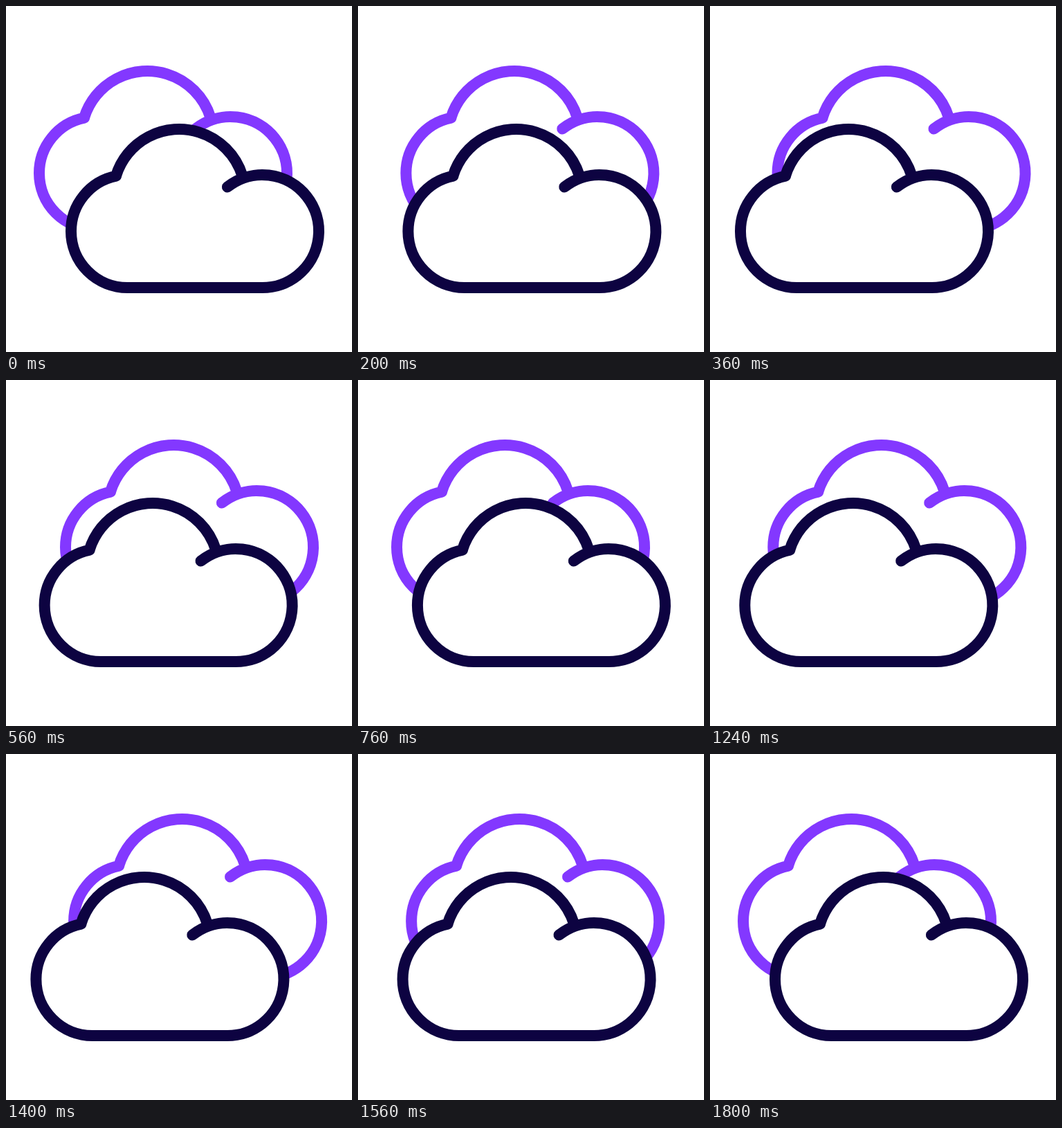
Recreate the animation shown at these times as an HTML page with a canvas. Size 500 px wide and 500 px high, loop 2 s.

```html
<!DOCTYPE html>
<html lang="en">
<head>
<meta charset="utf-8">
<title>Drifting clouds</title>
<style>
  html, body { margin: 0; width: 100%; height: 100%; overflow: hidden; background: #fff; }
  canvas { display: block; width: 500px; height: 500px; }
</style>
</head>
<body>
<canvas id="stage" width="500" height="500"></canvas>
<script>
const ctx = document.getElementById('stage').getContext('2d');
const LOOP = 2000, STEP = 40;

// Key times in ms and how far apart the clouds have drifted (0..1)
const KEYS = [[40, 0], [400, 1], [880, 0], [1360, 1], [1800, 0]];

function drift(t) {
  for (let i = 1; i < KEYS.length; i++) {
    const [t0, a] = KEYS[i - 1], [t1, b] = KEYS[i];
    if (t < t1) {
      const p = Math.max(0, (t - t0) / (t1 - t0));
      return a + (b - a) * p * p * (3 - 2 * p);
    }
  }
  return 0;
}

function arcBetween(path, cx, cy, r, x0, y0, x1, y1) {
  path.arc(cx, cy, r, Math.atan2(y0 - cy, x0 - cx), Math.atan2(y1 - cy, x1 - cx));
}

const cloud = new Path2D();
arcBetween(cloud, 370.5, 325.5, 81.5, 320.5, 262.3, 370.5, 407);  // right lobe
arcBetween(cloud, 175.5, 325.5, 81.5, 175.5, 407, 159.2, 245.6);  // base and left lobe
arcBetween(cloud, 250.3, 273.5, 95.5, 159.2, 245.2, 341.5, 245.2); // crown

function drawCloud(x, y, color) {
  ctx.save();
  ctx.translate(x, y);
  ctx.fillStyle = '#fff';
  ctx.fill(cloud);
  ctx.strokeStyle = color;
  ctx.lineWidth = 16;
  ctx.lineCap = ctx.lineJoin = 'round';
  ctx.stroke(cloud);
  ctx.restore();
}

function draw(t) {
  const d = drift(t);
  ctx.fillStyle = '#fff';
  ctx.fillRect(0, 0, 500, 500);
  drawCloud(-46 + 51.3 * d, -84, '#8338ff');
  drawCloud(-51.8 * d, 0, '#0d0341');
}

const start = performance.now();
function tick() {
  const t = (performance.now() - start) % LOOP;
  draw(Math.floor(t / STEP) * STEP);
  requestAnimationFrame(tick);
}
tick();
</script>
</body>
</html>
```
